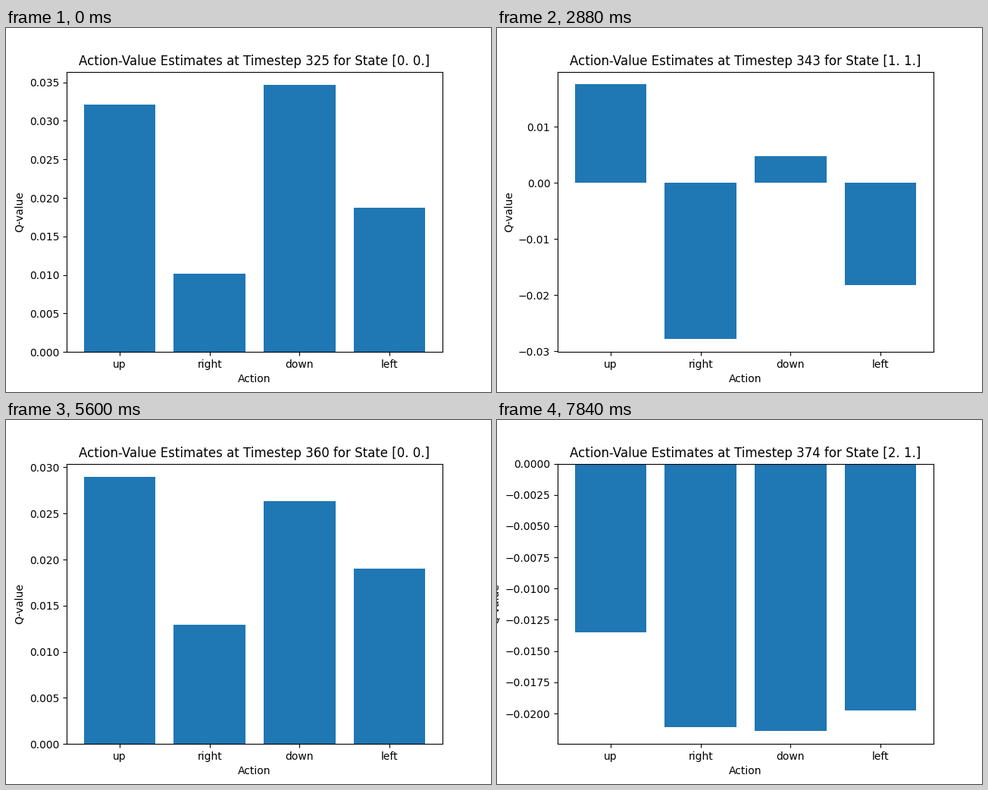
Write a matplotlib script that moves like this. It is 640 px wide and 480 px high and loops after 8000 ms.

```python
import numpy as np
import matplotlib.pyplot as plt
from matplotlib.animation import FuncAnimation

FRAMES = 50
INTERVAL = 160
FIRST_STEP = 325
ACTIONS = ["up", "right", "down", "left"]

# Turning points of the walk over the grid: frame, x, y.
TURNS = np.array([(0, 0, 0), (3, 1, 1), (10, 5, 1), (18, 1, 1), (21, 2, 0), (25, 1, 0),
                  (35, 0, 0), (37, 1, 0), (39, 0, 0), (41, 0, 0), (49, 2, 1)])

# Learned values, in thousandths, at a few moments of the walk.
LEARNED = {
    0: (32.11, 10.16, 34.65, 18.72),
    10: (-32.14, -45.39, -40.28, -22.49),
    18: (17.55, -27.85, 4.77, -18.2),
    25: (31.72, -29.38, 9.8, -15.45),
    35: (28.95, 12.93, 26.33, 19.01),
    41: (28.37, 15.57, 31.29, 20.64),
    49: (-13.5, -21.1, -21.37, -19.76),
}

# How strongly a step in x, y and time separates two estimates.
SPREAD = np.array([3, 1, 0.02])


def cell(frame):
    """Grid cell of the agent, walking straight between turning points."""
    return [int(np.rint(np.interp(frame, TURNS[:, 0], axis))) for axis in TURNS[:, 1:].T]


def q_values(frame):
    """Blend the learned values, weighted by closeness in cell and time."""
    here = np.array([*cell(frame), frame])
    known = np.array([[*cell(k), k] for k in LEARNED])
    dist = (((known - here) * SPREAD) ** 2).sum(axis=1) + 1e-9
    return np.average(list(LEARNED.values()), axis=0, weights=dist ** -2) / 1000


plt.rcParams["font.family"] = "DejaVu Sans"
fig, ax = plt.subplots(figsize=(6.4, 4.8), dpi=100)


def draw(frame):
    x, y = cell(frame)
    ax.clear()
    ax.bar(ACTIONS, q_values(frame), color="#1f77b4")
    ax.set_xlabel("Action")
    ax.set_ylabel("Q-value")
    ax.set_title(f"Action-Value Estimates at Timestep {FIRST_STEP + frame} "
                 f"for State [{x}. {y}.]")


anim = FuncAnimation(fig, draw, frames=FRAMES, init_func=lambda: draw(0),
                     interval=INTERVAL, repeat=True, repeat_delay=0)
plt.show()
```
